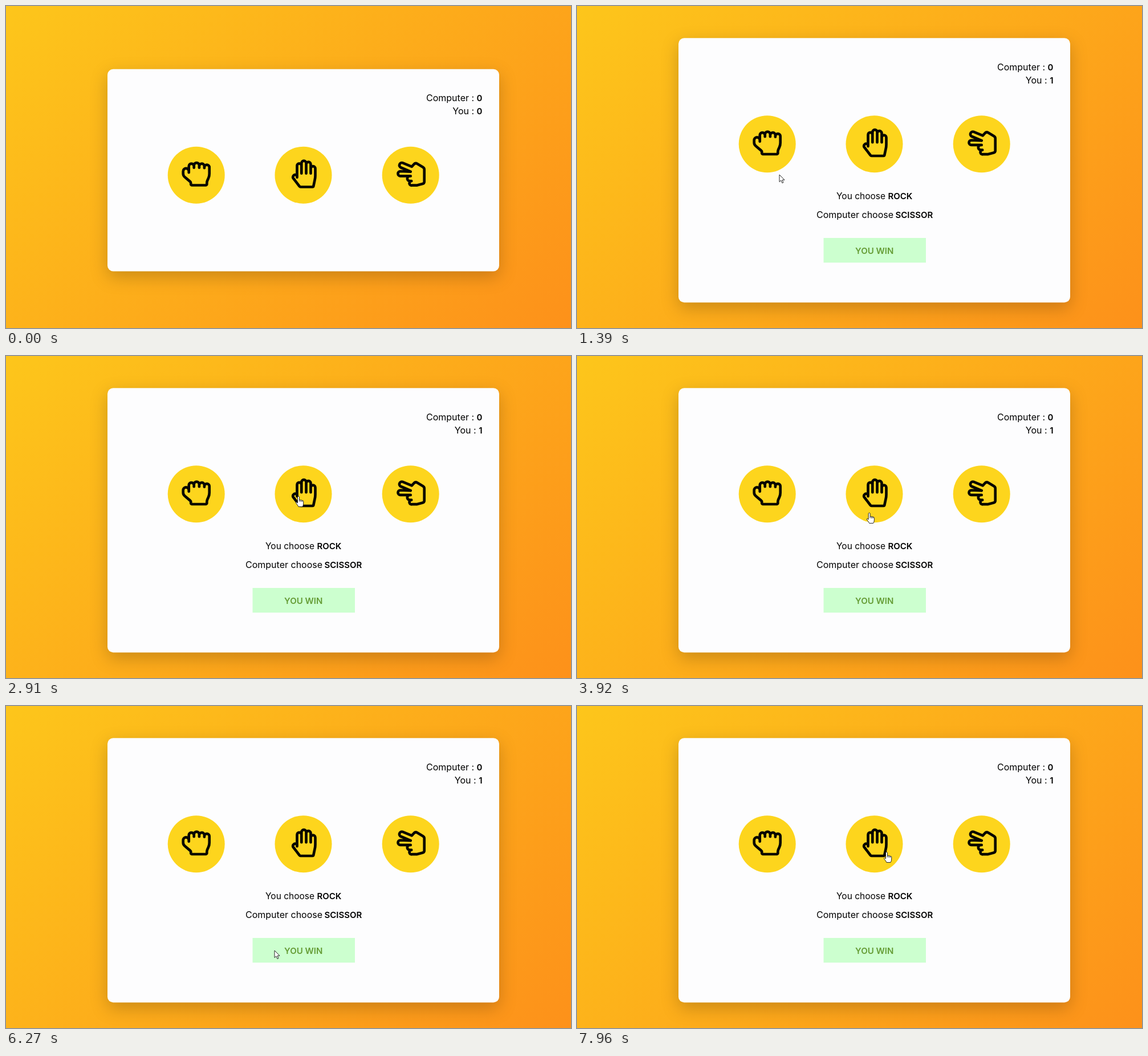
An HTML page for the animation above (8 s loop, 991 px wide and 565 px high).

```html
<!DOCTYPE html>
<html lang="en">
<head>
<meta charset="utf-8">
<title>Rock paper scissors</title>
<style>
html, body { margin: 0; width: 100%; height: 100%; overflow: hidden; }
svg {
  display: block; width: 100vw; height: 100vh;
  background: linear-gradient(135deg, #fdc61b, #fd911a);
  font: 16px Inter, "Open Sans", sans-serif;
}
.card { fill: #fdfdfe; filter: drop-shadow(0 10px 15px rgba(0, 0, 0, .2)); }
.bold { font-weight: 600; font-size: 15px; }
.disc { fill: #fdd51d; }
.icon { fill: none; stroke: #080800; stroke-width: 4.7; stroke-linecap: round; stroke-linejoin: round; }
.score { text-anchor: end; }
.cursor { fill: #fff; stroke: #111; stroke-width: .9; stroke-linejoin: round; }
</style>
</head>
<body>
<svg viewBox="0 0 991 565" preserveAspectRatio="none">
  <rect class="card" id="card" x="178" width="687" rx="10"/>
  <g id="board">
    <text class="score" x="835.5" y="167">Computer : <tspan class="bold">0</tspan></text>
    <text class="score" x="835.5" y="190">You : <tspan class="bold" id="you">0</tspan></text>
    <g id="choices"></g>
  </g>
  <g id="result">
    <text y="338.5"><tspan x="455" font-size="15.5">You choose</tspan><tspan class="bold" x="545.5">ROCK</tspan></text>
    <text y="372"><tspan x="420">Computer choose</tspan><tspan class="bold" x="558.5">SCISSOR</tspan></text>
    <rect x="432.5" y="407" width="179.5" height="43.3" fill="#ccffcf"/>
    <text class="bold" x="521.7" y="434.5" text-anchor="middle" fill="#649c34">YOU WIN</text>
  </g>
  <g id="cursor" class="cursor">
    <path id="arrow" d="M0 0V12.6L2.9 9.9 4.9 14.6 7 13.7 5 9.2H9Z"/>
    <path id="hand" d="M-1.5 1.2Q0-1 1.5 1.2V7Q2.4 5.8 4 7 5.5 6.3 6.4 7.6 8.3 7 8.7 9V13Q8.7 16 7 18.5H0Q-1 16-4 12.5-5 10.5-3.4 10.2L-1.5 12ZM1.5 7V9.5M4 7V10M6.4 7.6V10"/>
    <path id="beam" fill="none" d="M-2.3-6Q0-6 0-4.5V4.5Q0 6-2.3 6M2.3-6Q0-6 0-4.5M0 4.5Q0 6 2.3 6"/>
  </g>
</svg>
<script>
const $ = id => document.getElementById(id);
const LOOP = 8000, CLICK = 1050, SHIFT = 54.5, CIRCLE_Y = 296.7;

const choices = [
  [333.7, "M-13-4.5V-15.5a4.5 4.5 0 0 1 9 0V-13M-4-15.5V-17a4.6 4.6 0 0 1 9.2 0V-13M5.2-16a4.5 4.5 0 0 1 9 1V-12.5M14.2-14a4.4 4.3 0 0 1 8.8 .5V-2.5Q23 2 21.3 5.5L19.5 9.5Q18.6 11.5 18.6 14V15.8A2 2 0 0 1 16.6 17.8H-7.5A2 2 0 0 1-9.5 15.8V14Q-9.5 12.5-11 11.2L-20 3.5Q-23 1-23-2.5V-6.5A5 5 0 0 1-13-7"],
  [521.5, "M-11 4V-16.5a3.9 3.9 0 0 1 7.8 0V-3M-3.2-16.5V-21a4.1 4.1 0 0 1 8.2 0V-3M5-19a4 4 0 0 1 8 0V-3M13-11.5a4 4 0 0 1 8 0V1Q21 5 20 9L18 18.5A2.5 2.5 0 0 1 15.7 20.8H-4.8Q-6 20.8-6.7 19.8L-18 5A4 4 0 0 1-12 0.3L-11 1.5"],
  [709.7, "M0-6L-17-13.2A4.2 4.2 0 0 1-13.7-21.3L2-14.8 6-19.2Q8.5-21.8 11.5-20L21.5-14Q24-12.5 24-10V11.5Q24 14.5 21 15.3L11.5 17.9H3A3.9 3.9 0 0 1 .5 10.5H-1.5A4.4 4.4 0 0 1-1.5 1.7H-18A4.2 4.2 0 0 1-18-6.7L0-6M-1.5 1.7H0M.5 10.5H1.5"]
];
$("choices").innerHTML = choices.map(([x, d]) =>
  `<g transform="translate(${x} ${CIRCLE_Y})"><circle class="disc" r="50"/><path class="icon" d="${d}"/></g>`).join("");

// Pointer stops: time, x, y
const stops = [
  [130, 372, 600], [640, 337, 309], [1100, 337, 309], [1390, 355, 296],
  [2750, 513, 246], [3500, 513, 246], [4600, 512, 334.5], [5000, 512, 334.5],
  [6150, 471, 429], [6500, 471, 429], [7850, 543, 256], [LOOP, 543, 256]
];

// Selectable text: left, right, top, bottom
const lines = [[455, 588, 322, 345], [420, 623, 355, 378], [487, 556, 418, 441]];

function pointerAt(t) {
  const i = stops.findIndex(s => t < s[0]);
  if (i < 1) return stops[0].slice(1);
  const [t0, x0, y0] = stops[i - 1], [t1, x1, y1] = stops[i];
  const p = (t - t0) / (t1 - t0), e = p * p * (3 - 2 * p);
  return [x0 + (x1 - x0) * e, y0 + (y1 - y0) * e];
}

function pointerKind(x, y, played) {
  const cy = CIRCLE_Y - (played ? SHIFT : 0);
  if (choices.some(([cx]) => Math.hypot(x - cx, y - cy) < 50)) return "hand";
  const onText = played && lines.some(([l, r, a, b]) => x > l && x < r && y > a && y < b);
  return onText ? "beam" : "arrow";
}

const show = (id, on) => $(id).setAttribute("visibility", on ? "visible" : "hidden");

function draw(t) {
  const played = t >= CLICK;
  $("card").setAttribute("y", played ? 56.25 : 110.75);
  $("card").setAttribute("height", played ? 464 : 354.7);
  $("board").setAttribute("transform", `translate(0 ${played ? -SHIFT : 0})`);
  $("you").textContent = played ? 1 : 0;
  show("result", played);

  const [x, y] = pointerAt(t), kind = pointerKind(x, y, played);
  $("cursor").setAttribute("transform", `translate(${x} ${y})`);
  for (const id of ["arrow", "hand", "beam"]) show(id, t >= 130 && id === kind);
}

const start = performance.now();
function tick() {
  draw((performance.now() - start) % LOOP);
  requestAnimationFrame(tick);
}
tick();
</script>
</body>
</html>
```
